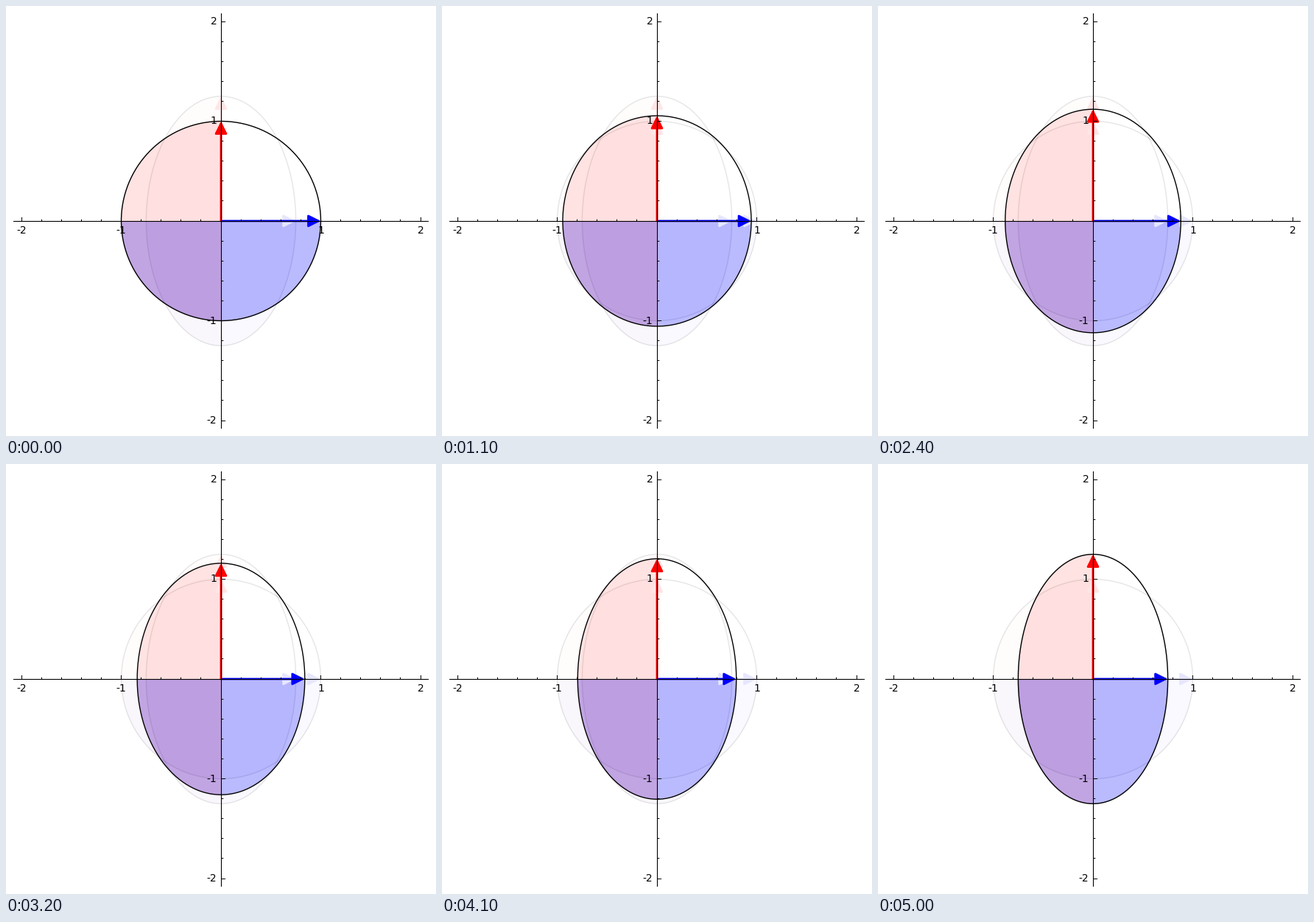
These frames come from a looping animation (584 by 584 pixels, 6 s). A matplotlib script:

```python
import numpy as np
import matplotlib.pyplot as plt
from matplotlib.animation import FuncAnimation
from matplotlib.patches import FancyArrowPatch

SIZE = 584          # stage, pixels
MID = 292.0         # origin, pixels
UNIT = 135.5        # pixels per unit
MOVES, FRAMES = 50, 60

fig = plt.figure(figsize=(SIZE / 100, SIZE / 100), dpi=100, facecolor="white")
ax = fig.add_axes([0, 0, 1, 1])
ax.set_xlim(0, SIZE)
ax.set_ylim(SIZE, 0)
ax.axis("off")


def arc(a, b, start, stop, n=200):
    t = np.linspace(start, stop, n)
    return np.column_stack([MID + UNIT * a * np.cos(t), MID - UNIT * b * np.sin(t)])


def half_shapes(a, b):
    """Lower half and left half of the ellipse."""
    return arc(a, b, np.pi, 2 * np.pi), arc(a, b, np.pi / 2, 3 * np.pi / 2)


def half(points, color, alpha, z):
    return ax.fill(*points.T, fc=color, ec="none", lw=0, alpha=alpha, zorder=z)[0]


def arrow(color, z):
    patch = FancyArrowPatch((MID, MID), (MID + UNIT, MID), lw=2, color=color,
                            arrowstyle="-|>,head_width=5,head_length=10",
                            shrinkA=0, shrinkB=0, mutation_scale=1, zorder=z)
    return ax.add_patch(patch)


class Ellipse:
    """Ellipse with two tinted halves and its semi-axis arrows."""

    def __init__(self, blue, red, strength, fill_z, line_z, arrow_z):
        lower, left = half_shapes(1, 1)
        self.halves = [half(lower, "blue", 0.25 * strength, fill_z),
                       half(left, "red", 0.1 * strength, fill_z)]
        self.curve, = ax.plot([], [], color="black", lw=1, alpha=strength, zorder=line_z)
        self.right = arrow(blue, arrow_z)
        self.up = arrow(red, arrow_z)

    def shape(self, a, b):
        for patch, points in zip(self.halves, half_shapes(a, b)):
            patch.set_xy(points)
        self.curve.set_data(*arc(a, b, 0, 2 * np.pi, 400).T)
        self.right.set_positions((MID, MID), (MID + UNIT * a, MID))
        self.up.set_positions((MID, MID), (MID, MID - UNIT * b))


def pixel(v):
    """Centre of the pixel that holds v."""
    return np.floor(v) + 0.5


def line(x, y, lw=0.72):
    ax.plot(x, y, color="black", lw=lw, solid_capstyle="butt", snap=False, zorder=5)


def draw_axes():
    axis = pixel(MID)
    line([10, 574], [axis, axis], 0.8)
    line([axis, axis], [10, 574], 0.8)
    for k in range(-10, 11):
        if k == 0:
            continue
        major = k % 5 == 0
        size = 5.6 if major else 2.8
        x, y = MID + UNIT * k / 5, MID - UNIT * k / 5
        line([pixel(x)] * 2, [axis, axis - size])
        line([axis, axis + size], [pixel(y)] * 2)
        if major:
            style = dict(family="DejaVu Sans", size=10, zorder=7)
            ax.text(x, MID + 5.6, str(k // 5), ha="center", va="top", **style)
            ax.text(MID - 5.6, y, str(k // 5), ha="right", va="center", **style)


draw_axes()
for radii in ((1, 1), (0.75, 1.25)):
    Ellipse((0.9, 0.9, 1), (1, 0.9, 0.9), 0.1, 1, 1.5, 3).shape(*radii)
main = Ellipse("blue", "red", 1, 2, 4.5, 4)


def update(i):
    d = 0.25 * min(i, MOVES) / MOVES
    main.shape(1 - d, 1 + d)
    return []


anim = FuncAnimation(fig, update, frames=FRAMES, interval=100, repeat=True,
                     repeat_delay=0, blit=False)
plt.show()
```
